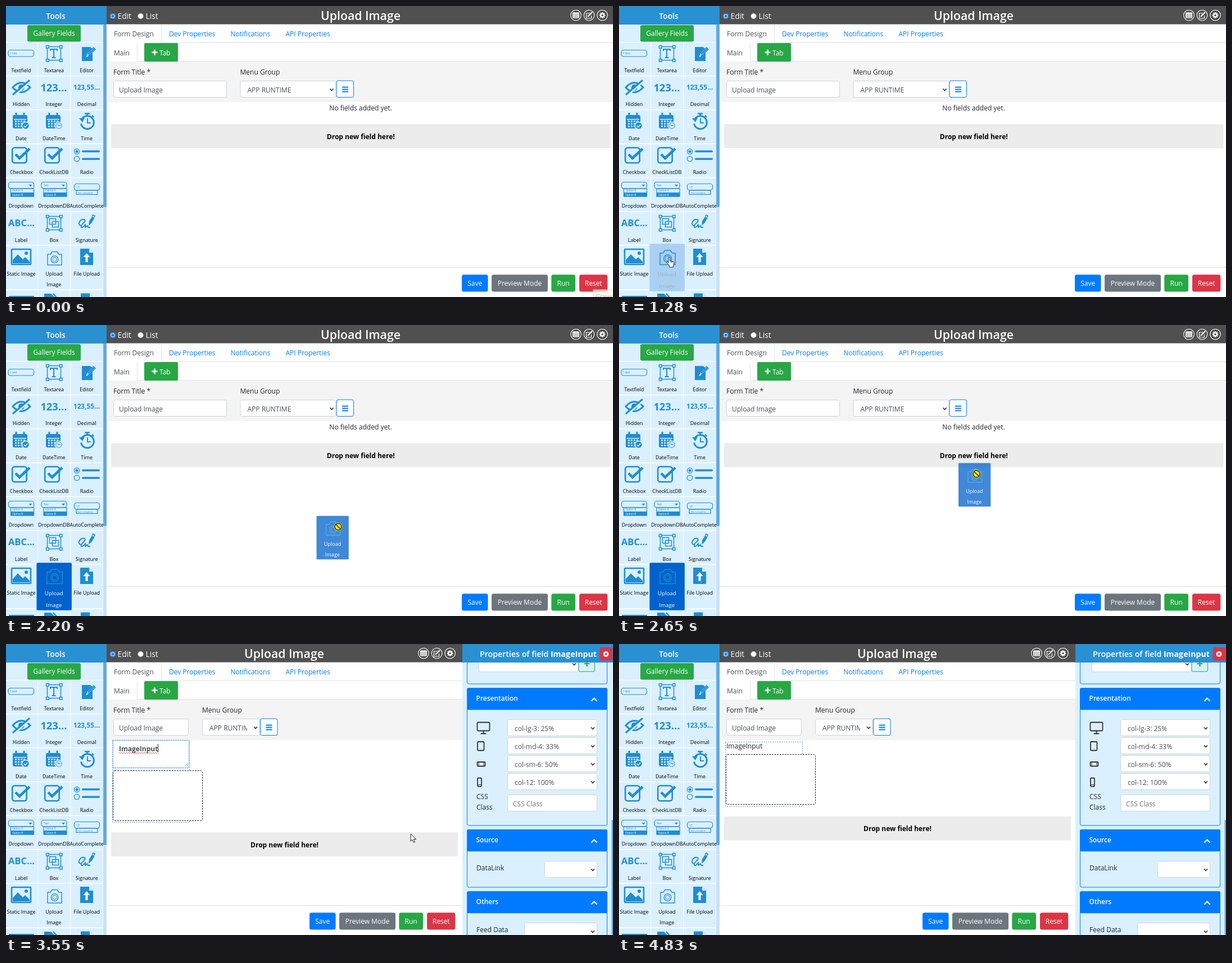
These frames come from a looping animation (1080 px wide and 518 px high, 4960 ms). An HTML page:

```html
<!DOCTYPE html>
<html lang="en">
<head>
<meta charset="utf-8">
<title>Form designer</title>
<style>
html, body { margin: 0; width: 100%; height: 100%; overflow: hidden; background: #fff; }
svg { display: block; width: 100vw; height: 100vh; }
text { font-family: "Open Sans", "Noto Sans", sans-serif; white-space: pre; }
.tile rect.bg { fill: var(--bg, #daf0ff); }
.tile text.label { fill: var(--fg, #000); }
</style>
</head>
<body>
<svg id="stage" viewBox="0 0 1080 518" preserveAspectRatio="none"></svg>
<script>
const LOOP = 4960;
const ICON = '#1f8dd2', HEAD = '#2990d2', PALE = '#daf0ff', LINK = '#007bff';
const GREEN = '#28a745', GREY = '#6c757d', RED = '#dc3545', INK = '#212529', FIELD = '#495057';

// Drawing helpers
const rect = (x, y, w, h, fill, r = 0, more = '') =>
  `<rect x="${x}" y="${y}" width="${w}" height="${h}" rx="${r}" fill="${fill}" ${more}/>`;
const frame = (x, y, w, h, stroke, r = 0, fill = 'none', more = '') =>
  rect(x, y, w, h, fill, r, `stroke="${stroke}" ${more}`);
const path = (d, stroke, width = 1, fill = 'none', more = '') =>
  `<path d="${d}" stroke="${stroke}" stroke-width="${width}" fill="${fill}" ${more}/>`;
const fill = (d, color) => `<path d="${d}" fill="${color}"/>`;
const dot = (x, y, r, color, stroke = 'none', width = 1) =>
  `<circle cx="${x}" cy="${y}" r="${r}" fill="${color}" stroke="${stroke}" stroke-width="${width}"/>`;
const text = (x, y, s, color = INK, size = 12, more = '') =>
  `<text x="${x}" y="${y}" font-size="${size}" fill="${color}" ${more}>${s}</text>`;
const MID = 'text-anchor="middle"', SEMI = 'font-weight="600"', BOLD = 'font-weight="700"';
const group = (id, body, more = '') => `<g id="${id}" ${more}>${body}</g>`;
const move = (x, y, body) => `<g transform="translate(${x} ${y})">${body}</g>`;

const button = (x, w, label, color) =>
  rect(x, 478.3, w, 30.2, color, 3.5) + text(x + w / 2, 498, label, '#fff', 12, MID);
const caret = (x, y) => path(`M${x - 3} ${y - 1.7}l3 3.2 3-3.2`, '#333', 1.6);
const input = (x, y, w, label = '', color = FIELD, pad = 10) =>
  frame(x + .5, y + .5, w - 1, 29, '#ced4da', 3, '#fff') + text(x + pad, y + 20.5, label, color);
const select = (x, y, w, label = '') => input(x, y, w, label, FIELD, 13) + caret(x + w - 8, y + 16);

// Tool icons, drawn in place
const line = (d, w = 1.3, more = '') => path(d, ICON, w, 'none', more);
const box = (x, y, w, h, r = 0, sw = 1.2) => frame(x, y, w, h, ICON, r, 'none', `stroke-width="${sw}"`);
const tiny = (x, y, s, color = ICON, size = 4.5) => text(x, y, s, color, size);

const handles = (x, y) => {
  let out = line(`M${x + 2.5} ${y + 2.5}h24v24h-24z`, 1.5);
  for (const dx of [0, 24]) for (const dy of [0, 24])
    out += frame(x + dx + .5, y + dy + .5, 4.5, 4.5, ICON, 0, PALE, 'stroke-width="1.5"');
  return out;
};
const calendar = x => {
  let out = rect(x, 194, 26, 24, ICON, 3) + line(`M${x + 6} 190v6m14-6v6`, 3) + rect(x + 2, 201, 22, 1.5, PALE);
  for (let i = 0; i < 12; i++)
    out += rect(x + 4 + i % 4 * 5, 204 + Math.floor(i / 4) * 4.5, 3, 2.6, PALE);
  return out + dot(x + 23, 213, 6.5, ICON, PALE, 1.5);
};
const checkbox = x => box(x + 1.2, 252.2, 25.5, 27, 4, 2.6) + line(`M${x + 7} 264l7 7 18-17`, 4.5);
const dropdown = (x, a, b, c) =>
  box(x, 313.5, 45, 11.5, 4) + tiny(x + 4, 321, a) + fill(`M${x + 36} 318h6l-3 3.5z`, ICON) +
  box(x + 4, 325, 41, 14) + rect(x + 4, 332, 41, 7.5, ICON) + tiny(x + 7, 330, b) + tiny(x + 7, 337.5, c, '#fff');
const page = (x, y) => fill(`M${x} ${y}h16l7 7v22h-23z`, ICON) + fill(`M${x + 16} ${y}v7h7z`, PALE);
const bigText = (x, y, s, size) => text(x, y, s, ICON, size, `${MID} ${BOLD}`);

const tools = [
  ['Textfield', box(4, 78.5, 45.5, 11.5, 4) + tiny(8, 86, 'I text', ICON, 5)],
  ['Textarea', handles(71, 70) + line('M79 80v-3h12v3M85 77v15m-3.5 0h7', 2)],
  ['Editor', fill('M135 73h15l4 4v21h-19z', ICON) + line('M145 87l13-12', 6) + line('M145 87l13-12', 3.2, `style="stroke:${PALE}"`) +
    line('M146 86l12-11', 2.6) + fill('M142 91l2-4 2.5 2.5z', PALE)],
  ['Hidden', line('M12 145q15-17 31 0q-16 17-31 0z', 3) + dot(27.5, 145, 5.5, ICON) +
    path('M15 159l29-25', PALE, 3) + line('M12 158l30-26', 3)],
  ['Integer', bigText(85, 152, '123...', 18.4)],
  ['Decimal', bigText(143.5, 148.5, '123,55...', 11.8)],
  ['Date', calendar(12) + path('M32 213l2.2 2.5 4-4.5', PALE, 1.5)],
  ['DateTime', calendar(71) + dot(94, 213, 4.8, PALE) + line('M91.5 211l2.5 2 3.5-.5', 1.2)],
  ['Time', line('M135.5 200.5a11.5 11.5 0 1 1-2 9', 3) + line('M140 191.5h9m-4.5 0v5M153 195l3 3', 2.6) +
    line('M145 200v8h6', 2) + fill('M130 200l10-1-4 8z', ICON)],
  ['Checkbox', checkbox(10)],
  ['CheckListDB', checkbox(68)],
  ['Radio', dot(126, 259, 4.7, 'none', ICON, 1.3) + dot(126, 259, 2.5, ICON) + dot(126, 272, 4.7, 'none', ICON, 1.3) +
    rect(135, 257, 32, 3.6, ICON, 1.8) + rect(135, 270.5, 32, 3.6, ICON, 1.8)],
  ['Dropdown', dropdown(4.5, '', 'Option A', 'Option B')],
  ['DropdownDB', dropdown(63, 'Text', 'Option A', 'Option B')],
  ['AutoComplete', box(121.5, 316.5, 45, 11.5, 4) + tiny(126, 325, 'IT', ICON, 6) + box(125, 328, 38, 7.5) +
    tiny(127, 333.5, 'Text complete', ICON, 4.2)],
  ['Label', bigText(27.5, 392, 'ABC...', 16.5)],
  ['Box', handles(71, 372) + box(77.5, 378.5, 11, 10, 0, 1.5) + box(82.5, 383.5, 11, 10, 0, 1.5)],
  ['Signature', line('M133 391q-5-2-2-7t8-4q4 2-1 6t-4 8q3 1 7-5l0 5 4-3 1 3 4 0', 2, 'stroke-linejoin="round"') +
    fill('M147 391l1-8 5-8 4.5 2.5-5 8.5z', ICON) + line('M153.5 374.5l1.5-2.5 3 1.5-1.5 3', 1.6)],
  ['Static Image', box(10, 433, 34, 27, 1, 2.6) + dot(36, 440, 3, ICON) + fill('M12 458v-6l9-10 9 9 4-4 8 8v3z', ICON)],
  ['Upload|Image', line('M74 442h5l3-4.5h9l3 4.5h5v19h-25z', 1.4, 'stroke-linejoin="round"') +
    dot(86.5, 451, 6.3, 'none', ICON, 1.3) + dot(86.5, 451, 3.8, 'none', ICON, 1)],
  ['File Upload', page(132, 432) + fill('M143.5 440l6 7h-4v9h-4v-9h-4z', '#fff')],
  ['', rect(5, 516, 45, 4, ICON)],
  ['', fill('M68 512h12l8 8h-20z', ICON) + line('M84 512l7 8', 2.4)],
  ['', page(133, 511.5)]
];
const tileIds = { Signature: 'sig', 'Upload|Image': 'up' };

const tile = ([label, icon], i) => {
  const row = Math.floor(i / 3), x = [-1, 57, 115.3][i % 3];
  const y = row < 7 ? 65 + 60.3 * row : 506, h = row === 6 ? 77.5 : 58.8;
  const words = label.split('|').map((s, n) =>
    text([27, 85.3, 143.7][i % 3], y + 53 + 19 * n, s, '', 9, `class="label" ${MID}`)).join('');
  return `<g class="tile" id="${tileIds[label] || ''}">${rect(x, y, 57.3, h, PALE, 1.5, 'class="bg"')}${icon}${words}</g>`;
};

const sidebar = () =>
  rect(0, 0, 179, 518, PALE) + rect(0, 64, 173, 454, '#fff') +
  `<g id="tiles" clip-path="url(#sideClip)">${tools.map(tile).join('')}</g>` +
  rect(0, 0, 179, 33, HEAD) + text(88.5, 22.5, 'Tools', '#fff', 13.8, `${MID} ${SEMI}`) +
  rect(38, 34, 95, 29.5, GREEN, 3) + text(85.5, 53, 'Gallery Fields', '#fff', 12, MID) +
  rect(173, 33, 6, 485, '#c9e2f4') + rect(173, 33, 6, 325, '#62a9de', 2);

// Round icons in the title bar
const badges = x =>
  [x, x + 23.5, x + 47].map(cx => dot(cx, 16.5, 9.3, 'none', '#fff', 1.1)).join('') +
  rect(x - 6, 11.5, 12, 10, '#fff', 1) + path(`M${x - 5} 14.7h10m-10 2.4h10m-10 2.4h10`, '#505050', .7) +
  path(`M${x + 25} 13h-6.5v9h9v-5`, '#fff', 1.2) + path(`M${x + 21} 19l8-8`, '#fff', 2.2) +
  dot(x + 47, 16.5, 3.2, 'none', '#fff', 2.4) +
  path(`M${x + 47} 11v11m-5.5-5.5h11m-9.4-3.9l7.8 7.8m0-7.8l-7.8 7.8`, '#fff', 1.4) + dot(x + 47, 16.5, 1.7, '#505050');

const common = () =>
  rect(179, 0, 901, 32.5, '#505050') +
  dot(190, 18, 5, '#fff') + dot(190, 18, 4.2, 'none', '#0075ff', 1.4) + dot(190, 18, 2.5, '#0075ff') +
  text(198.5, 23, 'Edit', '#fff', 13.8) + dot(239.5, 18, 5, '#fff', '#888', .8) + text(248.5, 23, 'List', '#fff', 13.8) +
  path('M276.5 33v32.5H1080M233.5 66v32.5H1080', '#dee2e6') +
  text(192, 54, 'Form Design', FIELD) + text(290, 54, 'Dev Properties', LINK) +
  text(399.5, 54, 'Notifications', LINK) + text(497.5, 54, 'API Properties', LINK) +
  text(192, 87.5, 'Main', FIELD) + rect(246, 66, 60, 33, GREEN, 2) +
  path('M259.5 82.5h10m-5-5v10', '#fff', 2.6) + text(273, 87.5, 'Tab', '#fff') +
  rect(182, 99, 898, 72, '#f4f4f4') + text(191, 122, 'Form Title *') +
  path('M179 465.5h901', '#dcdfe2');

const layout = (title, shift, inputW, menuX, menuW) =>
  text(title, 25, 'Upload Image', '#fff', 21.2, `${MID} ${SEMI}`) + badges(1014 + shift) +
  input(191, 133, inputW, 'Upload Image') + text(menuX, 122, 'Menu Group') +
  input(menuX, 133, menuW) +
  `<svg x="${menuX}" y="133" width="${menuW - 23}" height="30">${text(13, 20.5, 'APP RUNTIME', FIELD)}</svg>` +
  caret(menuX + menuW - 8, 149) +
  frame(menuX + menuW + .5, 133, 30.5, 29.5, LINK, 3, '#fff') +
  path(`M${menuX + menuW + 10.5} 144.5h11m-11 4h11m-11 4h11`, LINK, 1.8) +
  move(shift, 0, button(811, 46.5, 'Save', LINK) + button(864, 100, 'Preview Mode', GREY) +
    button(970.3, 42.7, 'Run', GREEN) + button(1020, 50.3, 'Reset', RED));

const dropBar = (y, w) => rect(187, y, w, 42.7, '#ececec') +
  text(187 + w / 2, y + 26.5, 'Drop new field here!', '#000', 12, `${MID} ${BOLD}`);
const dashed = (x, y, w, h, color, r, dash, inside) =>
  frame(x, y, w, h, color, r, inside, `stroke-dasharray="${dash}"`);
const outline = (y, h) => dashed(189.5, y, 137, h, '#5b93dd', 0, '2 2', 'none');
const imageBox = y => dashed(190.5, y, 159, 89, '#222', 3, '3 1.6', '#fff');

const editing = () =>
  frame(190.5, 171.5, 135, 49, '#a9d2fb', 2, '#fff', 'stroke-width="1.6"') + outline(171.5, 146) +
  path('M190 220.5h136', '#5b93dd', 1, 'none', 'stroke-dasharray="2 2"') +
  text(201, 191, 'ImageInput', FIELD, 12, BOLD) +
  path('M201 194' + 'q1-2 2 0t2 0'.repeat(17), '#e33', .8) + path('M270.5 178v15', '#222') +
  path('M318 218l6-6m-2.5 6l2.5-2.5', '#777', .8) +
  imageBox(225.5) + dropBar(335.3, 617);
const settled = () =>
  outline(174.5, 114.5) + text(191, 185.5, 'ImageInput') + imageBox(196.5) + dropBar(306.8, 617);

const card = (y, h, title) =>
  frame(820.5, y + .5, 249, h, LINK, 3) + rect(820, y, 250, 39.3, LINK, 3) +
  text(836.5, y + 23, title, '#fff', 12, SEMI) + path(`M1041.5 ${y + 23.5}l5-5 5 5`, '#fff', 2.2);

const device = (x, y, w, h) => frame(x, y, w, h, '#333', 1.5, 'none', 'stroke-width="1.8"');

const properties = () =>
  rect(812, 0, 268, 518, PALE) +
  frame(820.5, 20, 249, 51, LINK, 3) + input(841, 20, 178) + caret(1011, 36) +
  frame(1019, 20, 28.5, 29, GREEN, 2, PALE) + path('M1033.5 30v10m-5-5h10', GREEN, 2.2) +
  card(78, 244.5, 'Presentation') +
  ['lg-3: 25', 'md-4: 33', 'sm-6: 50', '12: 100'].map((s, i) => select(892, 134 + 32 * i, 160, `col-${s}%`)).join('') +
  device(838.5, 139.5, 22, 15) + path('M849.5 155v4m-5 .5h10', '#333', 2) +
  device(839, 174, 11.5, 15.5) + device(838.5, 210, 14, 7.5) + path('M841 210v7.5m9-7.5v7.5', '#333') +
  device(839, 238.5, 7, 15) + path('M839 250.5h7', '#333') +
  text(837, 276, 'CSS') + text(837, 295, 'Class') + input(892, 268, 160, 'CSS Class', GREY) +
  card(330, 102.5, 'Source') + text(837, 403, 'DataLink') + select(958, 386, 94) +
  card(440, 100, 'Others') + text(837, 513, 'Feed Data') + select(922, 496, 130) +
  rect(1077.5, 313, 2.5, 205, '#62a9de', 1) +
  rect(812, 0, 268, 33, HEAD) +
  text(843, 23, `Properties of field <tspan ${BOLD}>ImageInput</tspan>`, '#fff', 14.2, SEMI) +
  rect(1056.5, 6, 22.5, 23.5, RED, 3) + dot(1067.5, 18, 4.8, '#fff') + path('M1065.7 16.2l3.6 3.6m0-3.6l-3.6 3.6', RED, 1.3);

// Pointers, hot spot at 0,0
const ARROW = 'M0 0v13l3-2.8 2.2 5 2.2-1-2.2-4.8h4.2z';
const arrow = path(ARROW, '#222', 1, '#fff', 'stroke-linejoin="round"');
const hand = path('M0 .8q1.5-1.4 2.8 0v6l5.6 1.2q1.6.6 1.4 2.4l-1.2 5v2.6h-7v-2.4l-5-6q0-2 2-1.4l1.4 1.6z', '#222', 1, '#fff') +
  path('M4.5 7.5v3m2.2-2.6v3', '#222', .8);
const noDrop = dot(0, 0, 7.5, '#e9e02c') + dot(0, 0, 6, 'none', '#33320c', 1.5) + path('M-4.2 -4.2l8.4 8.4', '#33320c', 1.5);

const $ = id => document.getElementById(id);
$('stage').innerHTML =
  '<clipPath id="sideClip"><rect width="173" height="518"/></clipPath>' +
  rect(0, 0, 1080, 518, '#fff') + sidebar() + common() +
  group('wide', layout(631, 0, 202, 416.5, 171) + text(631, 185.5, 'No fields added yet.', INK, 12, MID) + dropBar(210.3, 888.5)) +
  group('split', layout(495, -271, 134, 349, 103) + group('edit', editing()) + group('done', settled()) + properties()) +
  group('tip', rect(1045, 505, 35, 13, '#f8f3e9', 0, 'stroke="#e6dccb" opacity=".75"') + text(1049, 521, 'Graver', '#c4bcae', 10.5)) +
  group('ghost', tile(tools[19], 19).replace('id="up"', ''), 'opacity=".75" style="--bg:#0062cc;--fg:#fff"') +
  group('arrow', arrow) + group('hand', hand) + group('ban', noDrop) +
  group('carry', arrow + frame(10.5, 13.5, 10, 6, '#333', 0, '#fff', 'stroke-dasharray="1 1"'));
$('tiles').append($('sig'), $('up'));

// Motion: [time, x, y]
const pointer = [
  [67, 1035, 510], [533, 598, 459], [800, 350, 440], [1067, 148, 404], [1133, 118, 428], [1267, 88, 447],
  [1467, 88, 447], [1600, 135, 449], [1867, 337, 453], [2133, 572, 389], [2267, 610, 329], [2400, 629, 294],
  [2533, 635, 274], [2667, 636, 265], [3000, 638, 226], [3333, 638, 226], [3533, 720, 338], [3800, 840, 434],
  [4200, 1012, 512], [4267, 1040, 530]
];
const dragged = [
  [1467, 57, 427], [1600, 85, 427], [1867, 280, 427], [2133, 530, 370], [2267, 575, 310], [2400, 596, 275],
  [2533, 603, 255], [2667, 604, 246], [3000, 604, 199]
];
const at = (keys, t) => {
  const i = keys.findIndex(k => k[0] > t);
  if (i < 0) return keys[keys.length - 1].slice(1);
  if (!i) return keys[0].slice(1);
  const [t0, x0, y0] = keys[i - 1], [t1, x1, y1] = keys[i], p = (t - t0) / (t1 - t0);
  return [x0 + (x1 - x0) * p, y0 + (y1 - y0) * p];
};
const show = (id, on) => { $(id).style.display = on ? '' : 'none'; };
const place = (id, [x, y]) => $(id).setAttribute('transform', `translate(${x} ${y})`);

// Tile hover: grows at once, colours fade in
const hover = (id, cx, cy, p) => {
  const el = $(id), s = 1.09;
  if (!p) {
    el.removeAttribute('transform');
    el.removeAttribute('style');
    return;
  }
  el.setAttribute('transform', `translate(${cx} ${cy}) scale(${s}) translate(${-cx} ${-cy})`);
  const mix = (a, b) => Math.round(a + (b - a) * p), fg = Math.round(255 * p ** .27);
  el.style.setProperty('--bg', `rgb(${mix(218, 0)},${mix(240, 98)},${mix(255, 204)})`);
  el.style.setProperty('--fg', `rgb(${fg},${fg},${fg})`);
};

const pointerKind = t =>
  t < 60 || t >= 4280 ? '' :
  t < 1050 ? 'arrow' : t < 1450 ? 'hand' : t < 2730 ? 'ban' : t < 3200 ? 'carry' : 'arrow';

function draw(t) {
  const step = Math.floor(t * .015 + .26) / .015; // screen capture at 15 per second
  const opened = t >= 3410, kind = pointerKind(t);
  show('wide', !opened);
  show('split', opened);
  show('edit', t < 4830);
  show('done', t >= 4830);
  show('tip', t < 70);
  show('ghost', step >= 1466 && t < 3200);
  const [gx, gy] = at(dragged, step);
  place('ghost', [gx - 57, gy - 427]);
  for (const id of ['arrow', 'hand', 'ban', 'carry']) show(id, id === kind);
  if (kind) place(kind, at(pointer, step));
  hover('sig', 144, 396, t >= 1050 && t < 1190 ? .22 : 0);
  hover('up', 85.7, 465.8, opened ? 0 : Math.min(1, Math.max(0, (step - 1200) / 300)));
}

const start = performance.now();
const tick = () => {
  draw((performance.now() - start) % LOOP);
  requestAnimationFrame(tick);
};
tick();
</script>
</body>
</html>
```
